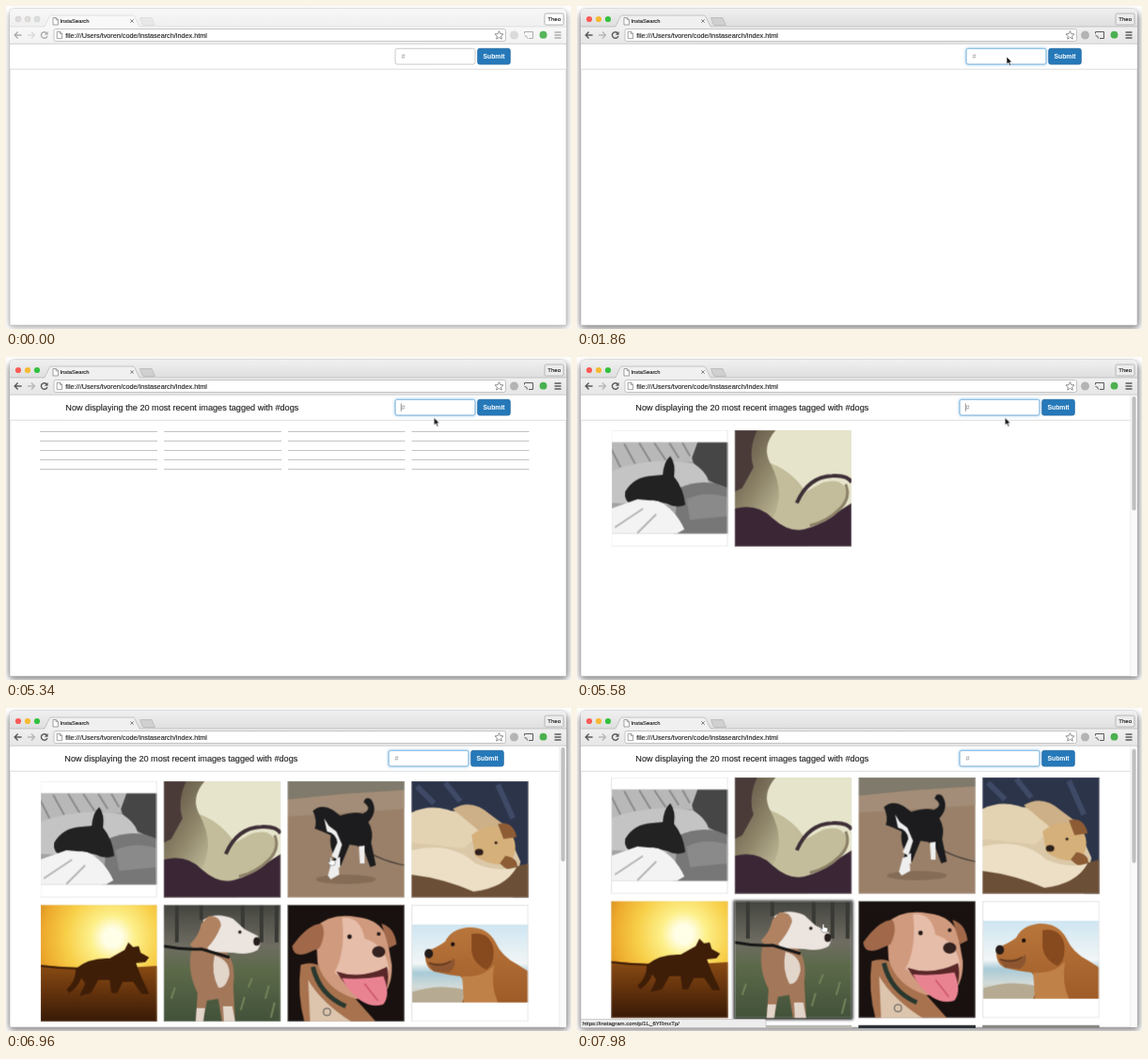
Write an HTML page that moves like this. It is 601 px wide and 344 px high and loops after 8000 ms.

```html
<!DOCTYPE html>
<html lang="en">
<head>
<meta charset="utf-8">
<title>InstaSearch</title>
<style>
  html, body { margin: 0; width: 100%; height: 100%; overflow: hidden; background: #fff; }
  svg.stage { display: block; width: 100%; height: 100%; }
  text { font-family: "Liberation Sans", Arial, sans-serif; white-space: pre; }
  .ink { fill: #222; stroke: #222; stroke-width: .14; }
  .line { fill: none; stroke: #5a5a5a; stroke-width: 1.4; }
  .frame { fill: none; stroke: #e4e4e4; }

  /* Every animation shares one 8 s clock. */
  .a { animation: 8s step-end infinite both; }
  .ease { animation-timing-function: linear; }
  #veil { animation-name: veil; }
  #deep { animation-name: wake; }
  .glow { animation-name: glow; }
  #cover { animation-name: type; }
  #caret { animation-name: blink; }
  #hash { animation-name: hash; }
  #title { animation-name: title; }
  #form { animation-name: form; }
  #rules { animation-name: rules; }
  #loaded, #bar { animation-name: loaded; }
  #scroll { animation-name: scroll; }
  #thumb { animation-name: thumb; }
  #halo { animation-name: halo; }
  #status { animation-name: status; }
  #pointer { animation-name: move; }
  #arrow { animation-name: arrow; }
  #hand { animation-name: hand; }
  .cell { animation-name: loaded; animation-delay: calc(var(--i) * 45ms); }

  @keyframes veil { 0% { opacity: 1 } 13.5%, 100% { opacity: 0 } }
  @keyframes wake { 0% { opacity: 0 } 13.5%, 100% { opacity: 1 } }
  @keyframes glow { 0%, 14% { opacity: 0 } 18.75%, 100% { opacity: 1 } }
  @keyframes type {
    0% { transform: none } 42.75% { transform: translateX(4px) }
    50.25% { transform: translateX(8.1px) } 54.75% { transform: translateX(12.2px) }
    57% { transform: translateX(15.9px) } 61.5%, 100% { transform: none }
  }
  @keyframes blink {
    0%, 23.25%, 36%, 49.5%, 83.25%, 97.5%, 100% { opacity: 0 }
    16.5%, 29.25%, 42%, 50.25%, 90% { opacity: 1 }
  }
  @keyframes hash { 0%, 61.5%, 100% { opacity: 1 } 42.75% { opacity: 0 } }
  @keyframes title {
    0% { opacity: 0 } 61.5% { opacity: 1; transform: none }
    69%, 100% { opacity: 1; transform: translateX(-1px) }
  }
  @keyframes form { 0% { transform: none } 69%, 100% { transform: translateX(-7px) } }
  @keyframes rules { 0%, 69%, 100% { opacity: 0 } 66.75% { opacity: 1 } }
  @keyframes loaded { 0% { opacity: 0 } 69%, 100% { opacity: 1 } }
  @keyframes scroll { 0%, 97% { transform: none } 99.75%, 100% { transform: translateY(-4px) } }
  @keyframes thumb { 0%, 97% { transform: none } 99.75%, 100% { transform: translateY(1.6px) } }
  @keyframes halo { 0%, 90.5% { opacity: 0 } 93%, 100% { opacity: 1 } }
  @keyframes status { 0% { opacity: 0 } 90%, 100% { opacity: 1 } }
  @keyframes move {
    0%, 4.5% { transform: translate(320px, -9px); animation-timing-function: ease-in-out }
    9.75% { transform: translate(463px, 54px) }
    11.25%, 23.25% { transform: translate(457px, 54px) }
    25.5%, 81.75% { transform: translate(455.3px, 64.6px); animation-timing-function: ease-in-out }
    91.5%, 100% { transform: translate(262px, 230px) }
  }
  @keyframes arrow { 0% { opacity: 1 } 84.5%, 100% { opacity: 0 } }
  @keyframes hand { 0% { opacity: 0 } 84.5%, 100% { opacity: 1 } }
</style>
</head>
<body>
<svg class="stage" viewBox="0 0 601 344">
  <defs>
    <linearGradient id="strip" x2="0" y2="1">
      <stop stop-color="#f0f0f0"/><stop offset="1" stop-color="#dedede"/>
    </linearGradient>
    <linearGradient id="tools" x2="0" y2="1">
      <stop stop-color="#f0f0f0"/><stop offset="1" stop-color="#e6e6e6"/>
    </linearGradient>
    <radialGradient id="dusk" cx=".62" cy=".28" r=".8">
      <stop offset=".1" stop-color="#fffee6"/><stop offset=".24" stop-color="#fdf08a"/>
      <stop offset=".5" stop-color="#f8cf48"/><stop offset=".75" stop-color="#eda92c"/>
      <stop offset="1" stop-color="#bf7317"/>
    </radialGradient>
    <linearGradient id="soil" x2="0" y2="1">
      <stop stop-color="#8a4c14"/><stop offset=".4" stop-color="#6b370e"/><stop offset="1" stop-color="#381a07"/>
    </linearGradient>
    <linearGradient id="shore" x2="0" y2="1">
      <stop stop-color="#cfe6f2"/><stop offset=".5" stop-color="#f2f6f6"/>
      <stop offset=".62" stop-color="#a9cbd7"/><stop offset=".8" stop-color="#d2dbd9"/>
      <stop offset="1" stop-color="#c9bda4"/>
    </linearGradient>
    <linearGradient id="coat" x2="0" y2="1">
      <stop stop-color="#b9763c"/><stop offset="1" stop-color="#a05c28"/>
    </linearGradient>
    <linearGradient id="lawn" x2="0" y2="1">
      <stop stop-color="#454540"/><stop offset=".35" stop-color="#6f6d62"/>
      <stop offset=".55" stop-color="#5d6a4a"/><stop offset="1" stop-color="#42523a"/>
    </linearGradient>
    <linearGradient id="skin" x2="1" y2="1">
      <stop stop-color="#554a3d"/><stop offset=".4" stop-color="#8f866a"/><stop offset=".7" stop-color="#c5bf9d"/>
    </linearGradient>
    <filter id="soft" x="-20%" y="-20%" width="140%" height="140%"><feGaussianBlur stdDeviation="3.5"/></filter>
    <filter id="near" x="-20%" y="-60%" width="140%" height="220%"><feGaussianBlur stdDeviation="1.8"/></filter>
    <clipPath id="page"><rect x="4" y="41" width="592" height="299.5"/></clipPath>
    <rect id="box" class="frame" x=".5" y=".5" width="123.5" height="123.5"/>
    <g id="sheet" fill="#fff" stroke="#888" stroke-width=".8">
      <path d="M0 0H3.4L5.4 2V7.5H0Z"/><path d="M3.2 0V2.2H5.4" fill="none"/>
    </g>
  </defs>

  <!-- Window -->
  <rect x="3" y="6" width="595" height="337" rx="5" opacity=".3" filter="url(#soft)"/>
  <rect id="deep" class="a" x="3" y="8" width="595" height="336" rx="5" fill-opacity=".22" filter="url(#soft)"/>
  <path d="M4 340V8Q4 3 9 3H591Q596 3 596 8V340Z" fill="#fff" stroke="#b0b0b0" stroke-width=".6"/>
  <path d="M4 22.5V8Q4 3 9 3H591Q596 3 596 8V22.5Z" fill="url(#strip)"/>
  <rect x="4" y="22" width="592" height="18" fill="url(#tools)"/>
  <path d="M4 22H41L46 11.5Q46.6 10 48 10H135Q136.5 10 137 11.5L142 22H596" fill="#f0f0f0" stroke="#b4b4b4" stroke-width=".7"/>
  <path d="M142.5 12.5H155L158.500 20.5H147Q145.500 20.5 145 19Z" fill="#d0d0d0" stroke="#b2b2b2" stroke-width=".7"/>
  <circle cx="13" cy="14" r="3.1" fill="#fc5b57"/>
  <circle cx="23" cy="14" r="3.1" fill="#f6b932"/>
  <circle cx="33" cy="14" r="3.1" fill="#33c13f"/>
  <rect x="573" y="8" width="20" height="12" rx="1.5" fill="#ececec" stroke="#aaa" stroke-width=".8"/>
  <path class="line" d="M16.600 31H10M12.600 27.600L9.200 31L12.600 34.400"/>
  <path class="line" opacity=".35" d="M23 31H30M27 27.600L30.400 31L27 34.400"/>
  <path class="line" d="M43.200 28.800A3.300 3.300 0 1 0 43.900 32"/>
  <path fill="#5a5a5a" d="M44.600 27V30.800H40.800Z"/>
  <path class="line" d="M583.500 28H590.500M583.500 31H590.500M583.500 34H590.500"/>
  <path class="line" style="stroke-width:1" d="M551.500 29.500V27.500H560.500V34.500H556M551.500 31.500Q554.500 31.500 554.500 34.500"/>
  <circle cx="540.500" cy="31" r="4.500" fill="#b4b4b4"/>
  <circle cx="571.500" cy="30.700" r="3.900" fill="#4bb04f"/>
  <g id="veil" class="a">
    <path d="M4 40V8Q4 3 9 3H591Q596 3 596 8V40Z" fill="#fff" opacity=".5"/>
    <g fill="#dcdcdc" stroke="#d0d0d0" stroke-width=".4">
      <circle cx="13" cy="14" r="3.1"/><circle cx="23" cy="14" r="3.1"/><circle cx="33" cy="14" r="3.1"/>
    </g>
    <rect x="573" y="8" width="20" height="12" rx="1.5" fill="#fff" stroke="#aaa" stroke-width=".8"/>
    <circle cx="571.500" cy="30.700" r="3.900" fill="#55b55c"/>
  </g>
  <path d="M4 40.300H596" stroke="#b9b9b9" stroke-width=".8"/>
  <rect x="51" y="24.500" width="480.500" height="13" rx="2" fill="#fff" stroke="#b5b5b5" stroke-width=".8"/>
  <use href="#sheet" x="50" y="12.500"/>
  <use href="#sheet" x="54.200" y="27.200"/>
  <path d="M524.500 26.600L525.800 29.600L529 29.900L526.600 32L527.300 35.200L524.500 33.500L521.700 35.200L522.400 32L520 29.900L523.200 29.600Z" fill="#fff" stroke="#777" stroke-width=".8"/>
  <path d="M132.300 14.300L135.700 17.700M135.700 14.300L132.300 17.700" stroke="#777" stroke-width=".9"/>
  <text class="ink" x="57.500" y="18.400" font-size="5.800">InstaSearch</text>
  <text class="ink" x="576.300" y="16.300" font-size="6">Theo</text>
  <text class="ink" x="63.300" y="33.600" font-size="7.280">file:///Users/tvoren/code/instasearch/index.html</text>

  <!-- Results -->
  <g clip-path="url(#page)">
    <g id="rules" class="a" stroke="#c4c4c4">
      <path id="bank" d="M36 79.500H161M168 79.500H293M300 79.500H424.500M431.500 79.500H556.500"/>
      <use href="#bank" y="10"/><use href="#bank" y="20"/><use href="#bank" y="30"/><use href="#bank" y="40"/>
    </g>
    <g id="loaded" class="a"><g id="scroll" class="a ease">
      <rect id="halo" class="a ease" x="166.500" y="209" width="127" height="127" fill="#222" filter="url(#near)"/>

      <svg class="cell a" style="--i:0" x="36.200" y="77.500" width="124.500" height="124.500">
        <rect y="13.500" width="124.500" height="97" fill="#a2a2a2"/>
        <path d="M0 13.500H92L86 34L0 44Z" fill="#b8b8b8"/>
        <path d="M0 20L10 40M14 15L26 37M30 14L42 34M46 14L58 32M62 14L72 30M76 14L84 28" stroke="#8b8b8b" stroke-width="2"/>
        <path d="M92 13.500H124.500V64L100 52Q88 40 86 30Z" fill="#464646"/>
        <path d="M0 44Q40 28 88 36Q106 48 104 62L60 80L0 78Z" fill="#c4c4c4"/>
        <path d="M72 62Q100 50 124.500 62V110.500H66Z" fill="#777"/>
        <path d="M80 74Q100 64 124.500 72V92L84 96Z" fill="#8a8a8a"/>
        <path d="M15 66Q24 50 44 49L55 48Q56 34 63 28Q69 36 67 50Q77 62 79 80Q70 84 60 79L44 75L24 81Q13 76 15 66Z" fill="#222"/>
        <path d="M0 84L28 74L50 76Q68 84 78 106L70 110.500H0Z" fill="#f3f3f3"/>
        <path d="M4 104L34 84M28 110L48 90" stroke="#b5b5b5" stroke-width="2"/>
        <use href="#box"/>
      </svg>

      <svg class="cell a" style="--i:1" x="167.700" y="77.500" width="124.500" height="124.500">
        <rect width="124.500" height="124.500" fill="#e6e4cb"/>
        <path d="M0 0H44Q28 18 38 36Q64 46 78 70V124.500H0Z" fill="url(#skin)"/>
        <path d="M0 0H24Q14 22 20 40L8 62L0 66Z" fill="#4a3b39"/>
        <path d="M38 36Q66 46 72 68L94 56Q116 50 120 68Q116 86 94 98L62 112L38 98Q56 70 38 36Z" fill="#c3bd9b"/>
        <path d="M0 84Q24 78 40 94Q58 110 74 106Q96 100 112 86L124.500 78V124.500H0Z" fill="#3a2635"/>
        <path d="M66 78Q78 50 104 49Q120 48 124.500 56" fill="none" stroke="#3f3038" stroke-width="4"/>
        <path d="M118 58Q124 72 112 84Q98 98 80 102" fill="none" stroke="#8c8168" stroke-width="3"/>
        <use href="#box" opacity=".3"/>
      </svg>

      <svg class="cell a" style="--i:2" x="299.400" y="77.500" width="124.500" height="124.500">
        <rect width="124.500" height="124.500" fill="#9a8069"/>
        <path d="M0 0H124.500V10L60 14L0 20Z" fill="#7f7a6b"/>
        <path d="M0 20L60 14L124.500 10V30L0 38Z" fill="#a38d78"/>
        <ellipse cx="62" cy="105" rx="32" ry="5" fill="#846c57"/>
        <path d="M65 62Q92 84 124.500 90" fill="none" stroke="#443b35" stroke-width="1.200"/>
        <path d="M27 32Q36 24 48 31L56 37Q72 32 80 35Q91 30 81 23Q83 16 89 20Q97 32 86 44Q92 54 89 66L94 90L88 92L80 70L66 68L57 90L48 99L45 96L50 80Q44 70 46 58L37 54L29 51Q32 43 27 32Z" fill="#1c1c1e"/>
        <path d="M39 40L42 54Q52 56 53 66L47 80L53 84L58 68L52 54L44 48Z" fill="#eee"/>
        <path d="M47 86L54 84L55 100L46 105L43 101ZM52 83L56 81L56 92L51 94ZM76 70L82 69L82 88L77 88Z" fill="#eee"/>
        <use href="#box" opacity=".3"/>
      </svg>

      <svg class="cell a" style="--i:3" x="431.200" y="77.500" width="124.500" height="124.500">
        <rect width="124.500" height="124.500" fill="#dac8a8"/>
        <path d="M0 0H124.500V124.500H108L116 86L98 46L66 30L30 34L0 36Z" fill="#2c344a"/>
        <path d="M6 6L24 24M36 2L52 22M92 4L108 40" stroke="#3e4a66" stroke-width="6"/>
        <path d="M0 34Q24 22 52 36L78 52L56 72L0 66Z" fill="#e4d3b2"/>
        <path d="M44 30Q64 18 84 36L100 48L80 60Z" fill="#cdb087"/>
        <path d="M64 58Q84 42 104 54Q116 68 106 86Q88 94 68 80Z" fill="#d6b07a"/>
        <path d="M92 46Q108 42 112 60L98 62ZM100 80Q116 82 112 98Q102 96 94 88Z" fill="#8d5c35"/>
        <ellipse cx="72" cy="76" rx="4.500" ry="3.500" fill="#2f211d"/>
        <circle cx="90" cy="66" r="1.600" fill="#2f211d"/>
        <path d="M0 96Q36 88 70 108L116 90L124.500 88V124.500H0Z" fill="#6b4f36"/>
        <path d="M0 74Q42 64 68 88Q92 98 112 92Q100 114 66 118Q34 104 0 100Z" fill="#ecdfc6"/>
        <use href="#box" opacity=".3"/>
      </svg>

      <svg class="cell a" style="--i:4" x="36.200" y="209.600" width="124.500" height="124.500">
        <rect width="124.500" height="124.500" fill="url(#dusk)"/>
        <path d="M0 64Q60 70 124.500 65V124.500H0Z" fill="url(#soil)"/>
        <path d="M0 65Q30 69 60 68" fill="none" stroke="#3d1e08" stroke-width="2"/>
        <path d="M38 68Q52 56 74 57L90 48L94 40L99 45L105 44L107 51L116 56L112 61L102 62Q106 74 113 88L116 95H108L99 82L88 82L82 94H76L74 80L62 80L54 94L42 97L48 84L44 78Q40 88 31 94L28 90Q38 82 38 68Z" fill="#3f1e08"/>
        <use href="#box" opacity=".3"/>
      </svg>

      <svg class="cell a" style="--i:5" x="167.700" y="209.600" width="124.500" height="124.500">
        <rect width="124.500" height="124.500" fill="url(#lawn)"/>
        <path d="M14 0V40M40 0V16M84 0V30M104 0V40M120 0V40" stroke="#393a35" stroke-width="4"/>
        <path d="M8 100L12 88M82 112L86 98M108 100L112 86M114 120L118 104M90 88L94 78" stroke="#74835a" stroke-width="2"/>
        <path d="M30 46Q44 34 62 46Q78 58 74 86L76 124.500H62L58 100L46 102L42 124.500H34L36 94Q24 70 30 46Z" fill="#a3775a"/>
        <path d="M54 54Q70 58 70 74Q66 90 58 88Q50 72 54 54ZM63 108H73L76 124.500H64ZM35 110H44L42 124.500H34Z" fill="#e2d5ca"/>
        <path d="M42 16Q56 7 74 15L86 26L100 33Q105 41 100 48Q90 54 74 51L50 50Q40 42 42 16Z" fill="#ece4df"/>
        <path d="M48 12Q60 11 61 22Q56 36 46 46Q30 48 28 42Q38 32 40 20Z" fill="#b08261"/>
        <ellipse cx="99" cy="39" rx="3.600" ry="4.500" fill="#261f1d"/><circle cx="81" cy="29" r="1.800" fill="#261f1d"/>
        <path d="M0 44Q20 48 40 47L70 56" fill="none" stroke="#171717" stroke-width="3"/>
        <use href="#box" opacity=".3"/>
      </svg>

      <svg class="cell a" style="--i:6" x="299.400" y="209.600" width="124.500" height="124.500">
        <rect width="124.500" height="124.500" fill="#18110f"/>
        <path d="M14 64Q34 56 58 84L94 124.500H18Q10 96 14 64Z" fill="#a8724f"/>
        <path d="M22 80Q36 104 68 124.500H24Z" fill="#dcc4ad"/>
        <path d="M30 24Q46 8 74 13Q100 16 106 36L111 64Q112 92 94 102L72 100Q40 90 32 62Z" fill="#d09a7e"/>
        <path d="M58 14Q78 12 82 36Q104 42 108 68Q106 82 94 84Q66 86 50 72Q62 50 58 14Z" fill="#e6bda9"/>
        <path d="M36 20Q22 20 5 44Q6 56 20 52L34 46Q42 30 36 20ZM100 20Q114 24 116 42L108 46Z" fill="#a1684a"/>
        <path d="M52 71Q78 80 106 66Q110 88 98 104Q72 104 52 71Z" fill="#5a2729"/>
        <path d="M58 78Q78 80 102 76Q110 96 102 106Q90 110 78 102Q64 92 58 78Z" fill="#e98392"/>
        <path d="M82 84L96 102" stroke="#cb5569" stroke-width="1.500"/>
        <ellipse cx="97" cy="50" rx="7" ry="6" fill="#33221f"/>
        <circle cx="66" cy="34" r="2.400" fill="#241917"/><circle cx="97" cy="31" r="2" fill="#241917"/>
        <path d="M27 66Q34 96 62 108" fill="none" stroke="#29382f" stroke-width="5"/>
        <circle cx="42" cy="114" r="4" fill="none" stroke="#555"/>
        <use href="#box" opacity=".3"/>
      </svg>

      <svg class="cell a" style="--i:7" x="431.200" y="209.600" width="124.500" height="124.500">
        <rect width="124.500" height="124.500" fill="#fff"/>
        <svg y="21" width="124.500" height="83">
          <rect width="124.500" height="83" fill="url(#shore)"/>
          <path d="M0 72Q30 62 60 70V83H0Z" fill="#b6aa92"/>
          <path d="M15 29Q28 24 36 18Q42 5 60 3Q80 2 89 18Q96 34 112 42L124.500 50V83H54Q62 66 52 55Q40 54 24 50Q13 45 15 29Z" fill="url(#coat)"/>
          <path d="M64 10Q82 7 87 24Q89 42 80 48Q66 42 64 28Z" fill="#87491e"/>
          <path d="M17 40Q34 44 46 36Q48 46 40 51L24 50Z" fill="#8d5630"/>
          <path d="M54 55Q76 57 88 43Q84 66 92 83H56Z" fill="#c08149"/>
          <ellipse cx="18.500" cy="31" rx="4.500" ry="5" fill="#251b18"/><circle cx="44" cy="21" r="2.200" fill="#21150f"/>
          <path d="M19 41Q32 46 42 39" fill="none" stroke="#4c2a15"/>
        </svg>
        <use href="#box"/>
      </svg>

      <path d="M36.200 341.700H160.700V352H36.200ZM167.700 341.700H292.200V352H167.700Z" fill="#b9b9b4"/>
      <path d="M299.400 341.700H424V352H299.400Z" fill="#2c3136"/>
      <path d="M431.200 341.700H555.700V352H431.200Z" fill="#878783"/>
    </g></g>
  </g>

  <!-- Header bar -->
  <rect x="4.300" y="40.800" width="591.400" height="26" fill="#fff"/>
  <path d="M4 67.300H596" stroke="#dedede"/>
  <text id="title" class="a ink" x="63.300" y="57" font-size="9.150">Now displaying the 20 most recent images tagged with #dogs</text>
  <g id="form" class="a">
    <g class="glow a ease">
      <rect x="412.800" y="44.200" width="87.400" height="19" rx="3" fill="#66afe9" opacity=".4" filter="url(#near)"/>
    </g>
    <rect x="414" y="45.300" width="85" height="16.800" rx="2.200" fill="#fff" stroke="#c4c4c4" stroke-width=".9"/>
    <g class="glow a ease">
      <rect x="414" y="45.300" width="85" height="16.800" rx="2.200" fill="none" stroke="#83c1ee"/>
    </g>
    <text x="420.200" y="56.300" font-size="7.300" fill="#555">dogs</text>
    <g id="cover" class="a">
      <rect x="420" y="47" width="24" height="13.500" fill="#fff"/>
      <path id="caret" class="a" d="M420.300 49.500V57.800" stroke="#666" stroke-width=".7"/>
    </g>
    <text id="hash" class="a" x="420.400" y="56.300" font-size="7.300" fill="#8c8c8c">#</text>
    <rect x="501.700" y="45.300" width="34.600" height="16.800" rx="2.200" fill="#2679b9" stroke="#2068a3" stroke-width=".8"/>
    <text x="507.500" y="56.200" font-size="6.800" font-weight="700" fill="#fff">Submit</text>
  </g>

  <g id="bar" class="a">
    <rect x="588.700" y="41" width="7" height="299" fill="#fafafa"/>
    <path d="M588.700 41V340" stroke="#e6e6e6" stroke-width=".7"/>
    <rect id="thumb" class="a ease" x="590.400" y="42" width="4.200" height="121.500" rx="2.100" fill="#c0c0c0"/>
  </g>
  <g id="status" class="a">
    <path d="M4 340.500V331.500H199Q201 331.500 201 333.500V340.500Z" fill="#ededed" stroke="#bcbcbc" stroke-width=".7"/>
    <text class="ink" x="6" y="338" font-size="6.040">https://instagram.com/p/1L_6YRmxTp/</text>
  </g>

  <g id="pointer" class="a ease">
    <path id="arrow" class="a" d="M0 0V8L1.900 6.300L3.200 9.300L4.600 8.700L3.300 5.800H5.800Z" fill="#111" stroke="#fff" stroke-width=".6"/>
    <path id="hand" class="a" d="M-.9 .8Q0 -.6 .9 .8V3.400L4.200 4.200Q5 4.800 4.600 6.600L3.900 9H-.7L-3 5.600Q-2.600 4.400 -.9 5.600Z" fill="#fff" stroke="#555" stroke-width=".5"/>
  </g>
</svg>
</body>
</html>
```
